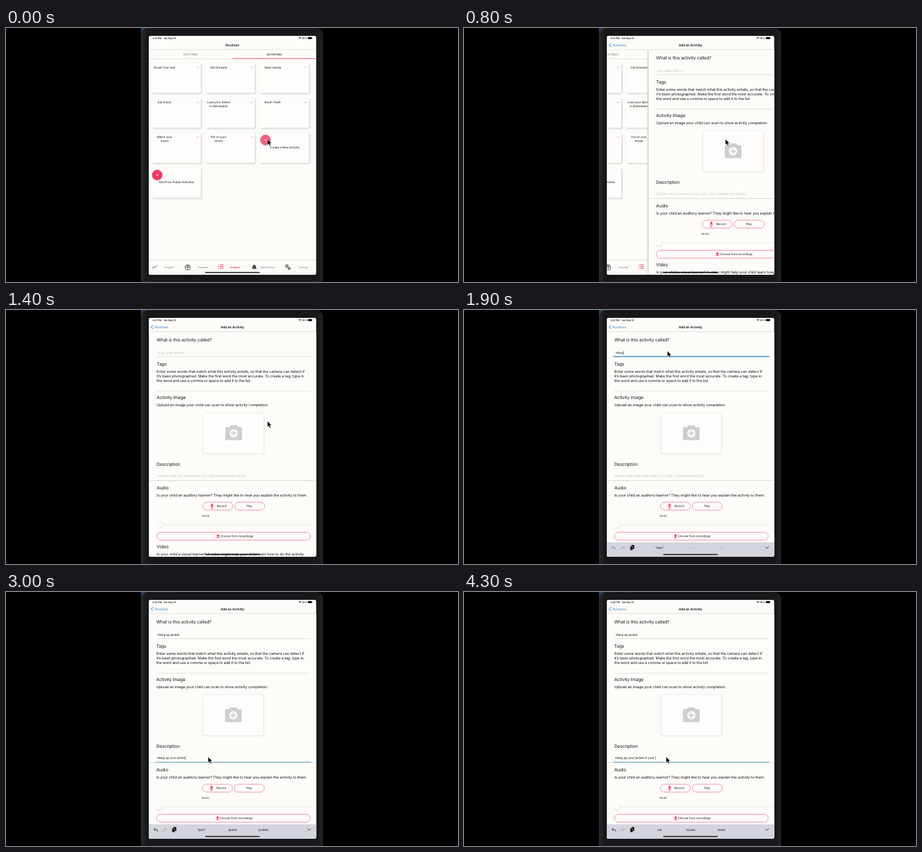
These frames come from a looping animation (690 by 388 pixels, 4400 ms). An HTML page:

```html
<!DOCTYPE html>
<html lang="en">
<head>
<meta charset="utf-8">
<style>
html, body { margin: 0; width: 100%; height: 100%; overflow: hidden; background: #000; }
svg { display: block; width: 100vw; height: 100vh; }
text { font-family: Inter, Roboto, sans-serif; letter-spacing: -.015em; text-rendering: geometricPrecision; white-space: pre; fill: #161616; }
.mid { text-anchor: middle; }
.head { font-size: 6.82px; }
.body { font-size: 5.7px; }
.input { font-size: 4.8px; }
.hint { font-size: 4.85px; fill: #c3c2c0; }
.card { font-size: 4.5px; }
.title { font-size: 5.05px; font-weight: 600; }
.tab { font-size: 3.75px; fill: #858585; }
.status { font-size: 3.75px; font-weight: 500; }
.rule { stroke: #d5d4d1; stroke-width: .7; }
.pill { fill: #fefdfc; stroke: #ee7d9b; stroke-width: .8; }
.line { fill: none; stroke-linecap: round; stroke-linejoin: round; }
</style>
</head>
<body>
<svg id="stage" viewBox="0 0 690 388" preserveAspectRatio="none"></svg>
<script>
const PINK = '#f03a66', BLUE = '#2f8fc9', PAPER = '#fdfcf8';
const LOOP = 4400, STEP = 100, WIDTH = 255;

const text = (x, y, cls, str, extra = '') => `<text x="${x}" y="${y}" class="${cls}" ${extra}>${str}</text>`;
const rect = (x, y, w, h, fill, extra = '') => `<rect x="${x}" y="${y}" width="${w}" height="${h}" fill="${fill}" ${extra}/>`;
const disc = (x, y, r, fill, extra = '') => `<circle cx="${x}" cy="${y}" r="${r}" fill="${fill}" ${extra}/>`;
const line = (d, color, w = .8, extra = '') => `<path class="line" d="${d}" stroke="${color}" stroke-width="${w}" ${extra}/>`;
const rule = (y, x1, x2) => `<path class="rule" d="M${x1} ${y}H${x2}"/>`;

const COLS = [223, 305.3, 388], ROWS = [53.5, 107, 160.3, 214];
const CARDS = [
  ['Brush Your Hair'], ['Get Dressed'], ['Wash Hands'],
  ['Eat Snack'], ['Load your dishes', 'in dishwasher'], ['Brush Teeth'],
  ['Match your', 'socks'], ['Put on your', 'shoes'], null, null
];

function card(lines, i) {
  const x = COLS[i % 3], y = ROWS[Math.floor(i / 3)];
  let out = rect(x + .8, y + .9, 75.2, 46.2, '#d3d1d0', 'rx="2" filter="url(#soft)"') + rect(x, y, 74.6, 45.6, '#fefdfb', 'rx="1.5"');
  if (lines) {
    out += lines.map((s, n) => text(x + 19.2, y + 8 + n * 5.5, 'card mid', s)).join('');
    out += [0, 1.6, 3.2].map(d => disc(x + 67.8 + d, y + 6.6, .55, '#e98ba4')).join('');
  }
  return out;
}

const addButton = (x, y, fill) => disc(x + .3, y + .7, 8, '#cfc5c5', 'filter="url(#soft)"') + disc(x, y, 7.9, fill) +
  line(`M${x - 1.3} ${y}h2.6m-1.3 -1.3v2.6`, '#fff', .6);

const gear = (x, y, r) => `<circle cx="${x}" cy="${y}" r="${r}" fill="none" stroke="#555" stroke-width="1.2"/>` +
  `<circle cx="${x}" cy="${y}" r="${r + .8}" fill="none" stroke="#555" stroke-width=".8" stroke-dasharray="1 1"/>`;

const tabBar = rect(218, 354, 255, 23, '#fbfaf7') + rule(354.3, 218, 473) +
  line('M222.8 367.6l2.5 -2.8 1.6 1.5 3 -3.6', '#555', .9) + text(249.3, 367, 'tab mid', 'Progress') +
  line('M273.6 363.7h7.8v2h-7.8zM274.2 365.7v3.6h6.6v-3.6M277.5 363.7v5.6M277.5 363.5q-3 -.3 -2 -2 1.5 -.8 2 2q.5 -2.800 2 -2 1 1.700 -2 2', '#555', .8) +
  text(300.7, 367, 'tab mid', 'Rewards') +
  [361.9, 364.5, 367.1].map(y => disc(324.7, y, .65, PINK) + line(`M326.8 ${y}h4.7`, PINK, 1)).join('') +
  text(349.8, 367, 'tab mid', 'Routines', `style="fill:${PINK};font-weight:600"`) +
  `<path d="M375.300 367.800q1.200 -1.200 1.200 -3.200 .2 -2.600 2.500 -3 2.300 .4 2.500 3 0 2 1.200 3.200zM377.900 368.500h2.200q-1.100 1.600 -2.200 0z" fill="#444"/>` +
  text(399, 367, 'tab mid', 'Notifications') +
  gear(428.700, 363.700, 1.5) + gear(432.2, 367.2, 1.3) + text(453.8, 367, 'tab mid', 'Settings');

const listPage = rect(218, 33, 255, 344, PAPER) +
  text(282, 41.6, 'card mid', 'ROUTINES', 'style="fill:#777"') +
  text(409.5, 41.6, 'card mid', 'ACTIVITIES', 'style="font-size:4.3px;font-weight:500"') +
  rule(47, 218, 473) + rect(346, 46, 127.5, 1.2, '#ee7595') +
  CARDS.map(card).join('') +
  addButton(396, 171, '#f25f83') + text(425.6, 183.5, 'card mid', 'Create a New Activity') +
  addButton(230.8, 224.5, PINK) + text(260.2, 237, 'card mid', 'Add From Public Activities') + tabBar;

const camera = '<path d="M336 179h4.500l1.600 -2.800h9.800l1.600 2.800h4.500q1.700 0 1.700 1.700v16.300q0 1.700 -1.700 1.700h-22q-1.700 0 -1.700 -1.700v-16.300q0 -1.700 1.700 -1.700z" fill="#cfcecd"/>' +
  disc(347, 188.300, 6.3, '#fdfdfc') + line('M343.600 188.300h6.800M347 184.900v6.800', '#cfcecd', 1.9);

const HEADS = [[48.2, 'What is this activity called?'], [84.800, 'Tags'], [136.300, 'Activity Image'], [237.500, 'Description'], [273.800, 'Audio'], [364.200, 'Video']];
const BODY = [
  [95.700, 'Enter some words that match what this activity entails, so that the camera can detect if'],
  [102.800, 'it’s been photographed. Make the first word the most accurate. To create a tag, type in'],
  [109.900, 'the word and use a comma or space to add it to the list.'],
  [147.400, 'Upload an image your child can scan to show activity completion.'],
  [284.700, 'Is your child an auditory learner? They might like to hear you explain the activity to them.'],
  [375.300, 'Is your child a visual learner? A video might help your child learn how to do the activity']
];
const field = (id, x, y, ruleY, hint) => rule(ruleY, 229, 466) +
  text(x, y, 'hint', hint, `id="${id}Hint"`) + text(x, y, 'input', '', `id="${id}"`) +
  rect(228, ruleY - .8, 238, 1.4, BLUE, `id="${id}Focus"`);

const formPage = rect(216.5, 33, 4, 344, '#c9c7c3', 'filter="url(#soft)"') + rect(218, 33, 256, 344, PAPER) +
  HEADS.map(([y, s]) => text(229.5, y, 'head', s)).join('') +
  BODY.map(([y, s]) => text(229.5, y, 'body', s)).join('') +
  field('name', 231.5, 66.7, 71.2, '(e.g. Wear Shoes)') +
  field('desc', 230.4, 255.4, 260.4, 'Explain steps that would help your child complete the activity.') +
  rule(124, 229, 464) + rule(260.6, 218, 473) +
  rect(300.5, 157.500, 92.800, 62, '#dddbd8', 'rx="3" filter="url(#soft)"') +
  rect(300.5, 156.800, 92.600, 62.300, '#fefdfc', 'rx="3" stroke="#e2e0dd" stroke-width=".5"') + camera +
  rect(299.8, 293.700, 45.8, 12, '', 'class="pill" rx="6"') + rect(348.5, 293.700, 45.800, 12, '', 'class="pill" rx="6"') +
  rect(229.7, 339.5, 234.700, 12, '', 'class="pill" rx="6"') +
  rect(312.5, 295.800, 2.6, 4.5, PINK, 'rx="1.3"') + line('M311.300 299q.3 2.600 2.500 2.600t2.500 -2.600M313.800 301.600v1.700m-1.400 0h2.800', PINK, .7) +
  text(328.5, 301.3, 'card mid', 'Record') + text(371, 301.3, 'card mid', 'Play') +
  text(298.4, 316, 'card', '00:00', 'style="font-size:4.15px"') +
  line('M229.500 328h240', '#e6e4e0', .8) + disc(233.500, 329, 4.2, '#d8d6d3', 'filter="url(#soft)"') + disc(233.3, 328.300, 4, '#fff') +
  `<path d="M323 342.300l2.500 2.700h-1.500v2h-2v-2h-1.500z" fill="${PINK}"/>` + line('M320.500 347.900h5', PINK, .9) +
  text(351.5, 347.2, 'card mid', 'Choose from recordings');

const keyboard = rect(218, 355, 255, 22, '#d2d5dc') +
  `<g id="undo">${line('M228 360.800l-2 2 2 2M226 362.800h3.700q2.200 .2 2 2.800', '#222', .8)}</g>` +
  line('M243 360.800l2 2 -2 2M245 362.800h-3.700q-2.200 .2 -2 2.800', '#9a9da4', .8) +
  rect(255.5, 359, 4.5, 6, '#111', 'rx=".6"') + rect(253.5, 361, 4.300, 6, '#111', 'rx=".6" stroke="#d2d5dc" stroke-width=".5"') +
  [298.5, 346, 393].map((x, i) => text(x, 364.600, 'input mid', '', `id="word${i}"`)).join('') +
  line('M460.500 361.800l2.300 2.300 2.300 -2.300', '#222', .9);

const header = rect(218, 12, 255, 21, PAPER) + rule(33, 218, 473) +
  text(223.4, 17, 'status', '', 'id="clock"') + text(241, 17, 'status', 'Sat May 16', 'style="font-size:3.7px"') +
  line('M446.900 14.700q1.700 -1.400 3.400 0M447.700 15.700q.9 -.7 1.800 0', '#111', .7) + disc(448.6, 16.5, .4, '#111') +
  text(452, 17, 'status', '90%') + rect(461, 13.700, 6, 3.300, '#111', 'rx=".8"') + rect(467.3, 14.700, .6, 1.300, '#111') +
  text(345.700, 27.700, 'title mid', 'Routines', 'id="oldTitle"') + text(345.700, 27.700, 'title mid', 'Add an Activity', 'id="newTitle"') +
  text(227, 27.800, 'body', 'Routines', 'id="back" style="font-size:5.2px;fill:#3d85cf"') +
  line('M224.200 23.200l-2.600 2.800 2.600 2.800', '#2f7fd0', 1, 'id="chevron"');

stage.innerHTML = `<defs>
  <filter id="soft" x="-20%" y="-20%" width="140%" height="140%"><feGaussianBlur stdDeviation=".8"/></filter>
  <clipPath id="screen"><rect x="218" y="12" width="255.500" height="365" rx="3"/></clipPath>
  <linearGradient id="bezel"><stop offset="0" stop-color="#2a2b2f"/><stop offset=".03" stop-color="#17181a"/><stop offset=".97" stop-color="#17181a"/><stop offset="1" stop-color="#222326"/></linearGradient>
</defs>` +
  rect(0, 0, 690, 388, '#000') + rect(206, 0, 10, 10, '#2b3f63') + rect(206, 0, 278, 400, 'url(#bezel)', 'rx="11"') +
  `<g clip-path="url(#screen)">${rect(218, 12, 256, 366, PAPER)}<g id="list">${listPage}</g><g id="form">${formPage}</g>` +
  `${header}<g id="keys">${keyboard}</g>${rect(0, 0, .7, 6, BLUE, 'id="caret"')}</g>` +
  rect(304, 372.700, 83.500, 1.500, '#111', 'rx=".75"') +
  `<path id="pointer" d="M0 0v9.200l2.100 -1.900 1.500 3.300 1.700 -.8 -1.500 -3.200h2.900z" fill="#000" stroke="#fff" stroke-width=".6"/>`;

const $ = id => document.getElementById(id);

// Time, spring phase of the page push
const PUSH = [[200, 0], [300, .5], [400, 1.165], [500, 1.65], [600, 2.15], [700, 2.15], [800, 2.69], [900, 3.4], [1000, 4.2], [1100, 4.2], [1200, 5.5], [1400, 8.3], [1600, 14]];
const POINTER = [[1400, 399, 169.700], [1500, 352, 112], [1600, 310.300, 62.300], [2400, 310.300, 62.300], [2500, 309.300, 160], [2600, 308.400, 251.700]];

const JACKET = 'Hang up your jacket';
// Time, focused field, typed text, suggestions
const TYPING = [
  [1600, 'name', '', 'I', 'The', 'I’m'],
  [1700, 'name', 'H', '“H”', 'He', 'Have'],
  [1800, 'name', 'Han', '“Ha”', 'Had', 'Have'],
  [1900, 'name', 'Hang', '"Han"', 'Hang', 'oh'],
  [2000, 'name', 'Hang u', '“Hang”', 'Hang', 'Hanging'],
  [2100, 'name', 'Hang up', '“up”', 'up', 'upon'],
  [2200, 'name', 'Hang up jac', '“jac”', 'jack', 'jacket'],
  [2300, 'name', 'Hang up jacket', '“jacke”', 'jacket', 'jackets'],
  [2600, 'desc', '', 'I', 'The', 'I’m'],
  [2700, 'desc', 'Hang', '“Han”', 'Hang', 'Hand'],
  [2800, 'desc', 'Hang up', '“up”', 'up', 'upon'],
  [2900, 'desc', 'Hang up your ja', '“your”', 'your', 'yours'],
  [3000, 'desc', 'Hang up your jacke', '“jack”', 'jacket', 'jackets'],
  [3100, 'desc', JACKET, '“jacket”', 'jacket', 'jackets'],
  [3200, 'desc', JACKET + ' ', 'and', 'in', 'on'],
  [3300, 'desc', JACKET + ' i', '“i”', 'in', 'is'],
  [3400, 'desc', JACKET + ' in', '“in”', 'in', 'into'],
  [3500, 'desc', JACKET + ' in ', 'the', 'your', 'a'],
  [3600, 'desc', JACKET + ' in y', '“y”', 'your', 'you'],
  [3700, 'desc', JACKET + ' in yo', '“yo”', 'your', 'you'],
  [3800, 'desc', JACKET + ' in you', '“you”', 'your', 'you'],
  [3900, 'desc', JACKET + ' in your', '“your”', 'your', 'yours'],
  [4100, 'desc', JACKET + ' in your ', '“your”', 'your', 'yours'],
  [4200, 'desc', JACKET + ' in your ', 'own', 'house', 'room'],
  [4300, 'desc', JACKET + ' in your ', 'car', 'house', 'head']
];

const clamp = v => Math.max(0, Math.min(1, v));
function track(rows, t, col = 1) {
  const i = rows.findIndex(r => r[0] >= t);
  if (i < 0) return rows[rows.length - 1][col];
  if (i === 0) return rows[0][col];
  const a = rows[i - 1], b = rows[i];
  return a[col] + (b[col] - a[col]) * (t - a[0]) / (b[0] - a[0]);
}
const show = (id, on) => $(id).setAttribute('opacity', on);
const move = (id, x, y = 0) => $(id).setAttribute('transform', `translate(${x} ${y})`);

function drawField(id, value, focused) {
  $(id).textContent = value;
  show(id + 'Hint', value ? 0 : 1);
  show(id + 'Focus', focused ? 1 : 0);
}

function draw(t) {
  const phase = track(PUSH, t);
  const offset = WIDTH * (1 + phase) * Math.exp(-phase);
  const done = 1 - offset / WIDTH;
  move('form', t < 300 ? WIDTH + 10 : offset);
  move('list', -.3 * WIDTH * done);
  show('oldTitle', clamp(1 - done * 1.5));
  show('newTitle', clamp(done * 1.5));
  show('back', clamp((done - .2) * 2));
  show('chevron', clamp((done - .35) * 3));
  move('pointer', track(POINTER, t), track(POINTER, t, 2));
  $('clock').textContent = t < 2500 ? '4:41 PM' : '4:42 PM';

  const row = TYPING.filter(r => r[0] <= t).pop();
  const [, active, typed, ...words] = row || [0, '', ''];
  drawField('name', active === 'name' ? typed : active ? 'Hang up jacket' : '', active === 'name');
  drawField('desc', active === 'desc' ? typed : '', active === 'desc');
  show('keys', row ? 1 : 0);
  show('caret', row ? 1 : 0);
  if (!row) return;
  show('undo', t < 2000 ? .4 : 1);
  words.forEach((w, i) => {
    $('word' + i).textContent = w.replace(/[“”]/g, '"');
    show('word' + i, t < 2000 && i ? .15 : 1);
  });
  const el = $(active);
  move('caret', +el.getAttribute('x') + el.getComputedTextLength() + .1, +el.getAttribute('y') - 4.800);
}

const start = performance.now();
function tick() {
  const t = (performance.now() - start) % LOOP;
  draw(Math.floor(t / STEP) * STEP);
  requestAnimationFrame(tick);
}
tick();
</script>
</body>
</html>
```
